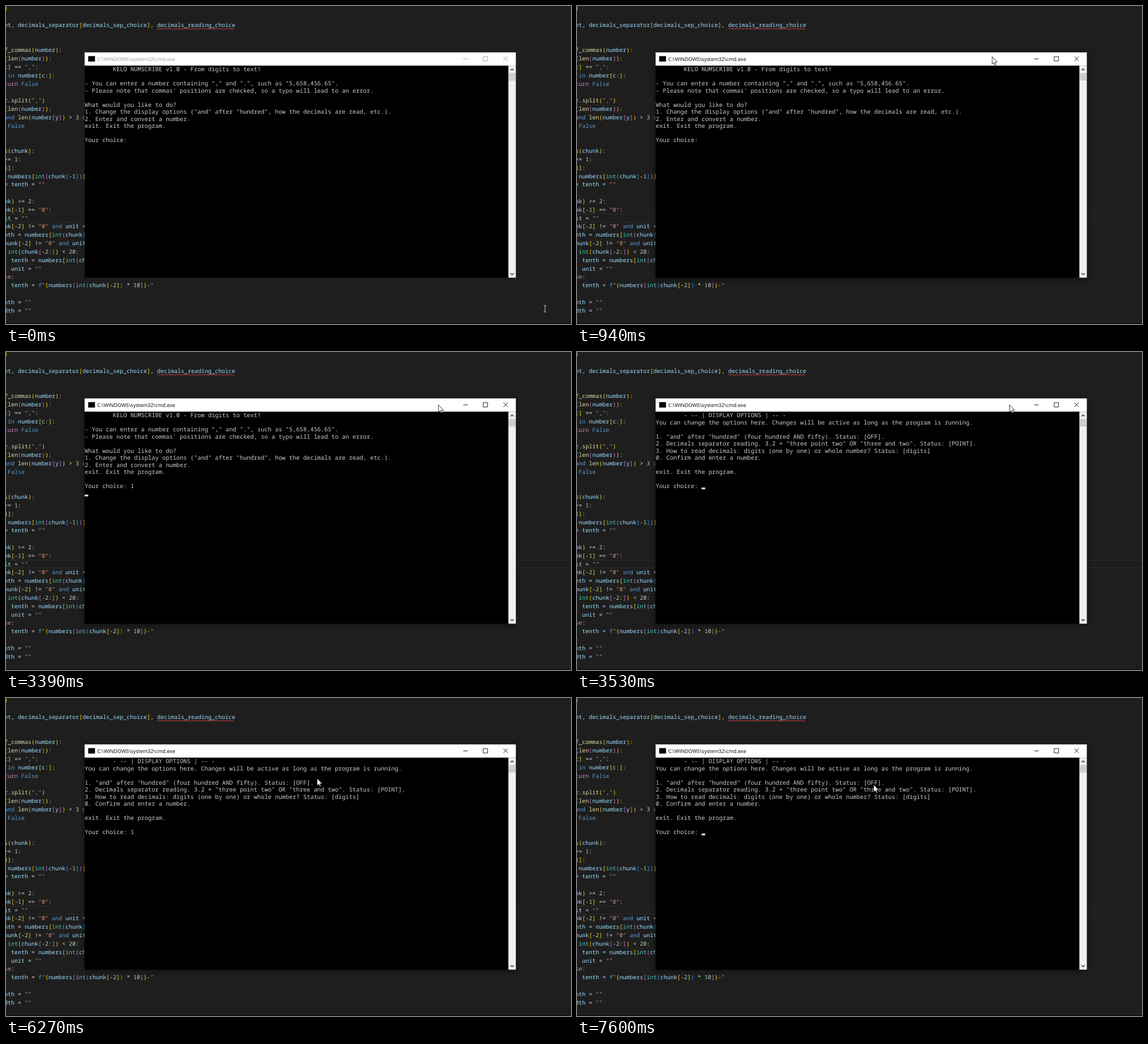
An HTML page that plays this animation: 998x561 px, repeating every 8000 ms.

```html
<!DOCTYPE html>
<html lang="en">
<head>
<meta charset="utf-8">
<title>Number converter</title>
<style>
  html, body { margin: 0; width: 100%; height: 100%; overflow: hidden; background: #1e1e1e; }
  svg { display: block; }
  text { white-space: pre; text-rendering: geometricPrecision; font-family: "Noto Sans Mono", monospace; }
  #code text { font-size: 10.005px; fill: #d4d4d4; }
  #console text { font-size: 10.396px; fill: #ccc; }
  #title { font: 9.01px "Open Sans", sans-serif; }
</style>
</head>
<body>
<svg width="998" height="561" viewBox="0 0 998 561">
  <rect width="998" height="561" fill="#1e1e1e"/>
  <path d="M0 366.9H998M0 380.9H998" stroke="#292929" stroke-width="1.5"/>
  <g id="code"></g>
  <path id="squiggle" fill="none" stroke="#f14c4c" stroke-width=".9"/>
  <rect y="560" width="998" height="1" fill="#050505"/>

  <rect id="shadow" x="139" y="84" width="761.5" height="397" style="filter:blur(5px)" opacity=".5"/>
  <rect x="138.8" y="81.8" width="761.8" height="397.5"/>
  <rect x="138.8" y="81.8" width="761.8" height="23.4" fill="#fff"/>
  <rect x="145.2" y="88.4" width="12" height="9.6"/>
  <g id="bar">
    <text id="title" x="161.3" y="96.6">C:\WINDOWS\system32\cmd.exe</text>
    <path d="M807.6 93.3H815.6M842.9 89.2H850.7V97H842.9ZM878.6 89.1L886.4 96.9M886.4 89.1L878.6 96.9"
      fill="none" stroke="currentColor" stroke-width=".9"/>
  </g>
  <rect x="887.4" y="105.2" width="13.2" height="374.1" fill="#f0f0f0"/>
  <rect x="888" y="118.2" width="12" height="13.4" fill="#cdcdcd"/>
  <path d="M891.2 113.6L894 110.8L896.8 113.6M891.2 471.4L894 474.2L896.8 471.4"
    fill="none" stroke="#484848" stroke-width="1.5"/>

  <g id="console"></g>
  <rect id="caret" width="6.24" height="3.1" fill="#f2f2f2"/>

  <circle id="click" cx="726.8" cy="89.4" r="9.3" fill="#ecd914"/>
  <path id="beam" d="M-2.4 -5.8H-.8L0 -5.2L.8 -5.8H2.4M0 -5.2V5.2M-2.4 5.8H-.8L0 5.2L.8 5.8H2.4"
    fill="none" stroke="#ddd" stroke-width=".9"/>
  <path id="arrow" d="M0 0V13L2.9 10.3L4.9 14.6L6.8 13.8L4.9 9.5H9Z" fill="#fff" stroke="#000" stroke-width=".8"/>
</svg>
<script>
const $ = id => document.getElementById(id);
const esc = s => s.replace(/&/g, '&amp;').replace(/</g, '&lt;');
const show = (el, on) => el.setAttribute('visibility', on ? 'visible' : 'hidden');

// Editor lines by row number; the left edge of the view cuts the first column.
const code = {
  '-2': ')',
  0: 'nt, decimals_separator[decimals_sep_choice], decimals_reading_choice',
  3: 'f_commas(number):',
  4: '(len(number)):',
  5: 'c] == ",":',
  6: ' in number[c:]:',
  7: 'turn False',
  9: 'r.split(",")',
  10: '(len(number)):',
  11: 'and len(number[y]) > 3 or',
  12: ' False',
  15: 's(chunk):',
  16: '>= 1:',
  17: '1]:',
  18: ' numbers[int(chunk[-1])]',
  19: '= tenth = ""',
  21: 'nk) >= 2:',
  22: 'nk[-1] == "0":',
  23: 'it = ""',
  24: 'nk[-2] != "0" and unit ==',
  25: 'nth = numbers[int(chunk[',
  26: 'hunk[-2] != "0" and unit',
  27: ' int(chunk[-2:]) < 20:',
  28: '  tenth = numbers[int(ch',
  29: '  unit = ""',
  30: 'se:',
  31: '  tenth = f"{numbers[int(chunk[-2]) * 10]}-"',
  33: 'nth = ""',
  34: 'dth = ""'
};

const token = /"[^"{}]*"|"(?=\{)|-"$|[a-z_]\w*|\d+|[()[\]{}]/gi;
const pairs = ['#ffd700', '#da70d6', '#179fff'];

function colour(word, next) {
  if (word.includes('"')) return '#ce9178';
  if (/^\d/.test(word)) return '#b5cea8';
  if (/^(and|or|in|False)$/.test(word) || word === 'f' && next === '"') return '#569cd6';
  if (/^(turn|se)$/.test(word)) return '#c586c0';
  if (word === 'int') return '#4ec9b0';
  return next === '(' ? '#dcdcaa' : '#9cdcfe';
}

function highlight(line) {
  let depth = 0, last = 0, out = '';
  for (const m of line.matchAll(token)) {
    const word = m[0], end = m.index + word.length;
    let fill;
    if (/^[([{]$/.test(word)) fill = pairs[depth++ % 3];
    else if (/^[)\]}]$/.test(word)) fill = pairs[(depth = Math.max(0, depth - 1)) % 3];
    else fill = colour(word, line[end]);
    out += esc(line.slice(last, m.index)) + `<tspan fill="${fill}">${esc(word)}</tspan>`;
    last = end;
  }
  return out + esc(line.slice(last));
}

$('code').innerHTML = Object.entries(code).map(([row, line]) =>
  `<text x="-3" y="${36.9 + row * 14.815}">${highlight(line)}</text>`).join('');

$('squiggle').setAttribute('d', 'M267 40.2' + 'q1.17 -2.6 2.34 0t2.34 0'.repeat(29));

// Console screens
const menu = [
  '        KELO NUMSCRIBE v1.0 - From digits to text!', '',
  '- You can enter a number containing "," and ".", such as "5,658,456.65".',
  '- Please note that commas\' positions are checked, so a typo will lead to an error.', '',
  'What would you like to do?',
  '1. Change the display options ("and" after "hundred", how the decimals are read, etc.).',
  '2. Enter and convert a number.',
  'exit. Exit the program.', '',
  'Your choice: '
];
const options = status => [
  '        - -- | DISPLAY OPTIONS | -- -',
  'You can change the options here. Changes will be active as long as the program is running.', '',
  `1. "and" after "hundred" (four hundred AND fifty). Status: [${status}].`,
  '2. Decimals separator reading. 3.2 = "three point two" OR "three and two". Status: [POINT].',
  '3. How to read decimals: digits (one by one) or whole number? Status: [digits]',
  '0. Confirm and enter a number.', '',
  'exit. Exit the program.', '',
  'Your choice: '
];
const off = options('OFF'), on = options('ON');

const cell = { x: 139, y: 105.2, w: 6.2375, h: 12.475 };
const prompt = [13, 10], typed = [14, 10], below = [0, 11];

// time, screen, typed text, caret cell
const steps = [
  [0, menu, '', null],
  [1270, menu, '', prompt],
  [1800, menu, '', null],
  [2340, menu, '', prompt],
  [2860, menu, '', null],
  [3190, menu, '1', typed],
  [3390, menu, '1', below],
  [3460, [], '', null],
  [3530, off, '', prompt],
  [4480, off, '1', typed],
  [5000, off, '1', null],
  [5520, off, '1', typed],
  [6040, off, '1', null],
  [6470, on, '', prompt],
  [7270, on, '1', typed],
  [7530, on, '1', below],
  [7600, off, '', prompt]
];

// time, x, y of the pointer
const path = [
  [0, 952, 534], [65, 952, 534], [200, 926, 478], [400, 822, 264], [560, 745, 120], [665, 727, 89],
  [870, 727, 89], [1000, 740, 90], [1130, 756, 92], [1260, 763.8, 93.2],
  [5780, 763.8, 93.2], [5860, 767, 95], [6000, 735, 101], [6130, 645, 122], [6260, 551, 141],
  [6400, 520, 157], [6530, 508, 168],
  [6650, 508, 168], [6900, 511, 174], [7260, 524, 153], [8000, 524, 153]
];

function pointer(t) {
  const i = Math.max(1, path.findIndex(p => p[0] >= t));
  const [t0, x0, y0] = path[i - 1], [t1, x1, y1] = path[i];
  const k = (t - t0) / (t1 - t0);
  return [x0 + (x1 - x0) * k, y0 + (y1 - y0) * k];
}

let current;
function drawConsole(step) {
  if (step === current) return;
  current = step;
  const [, rows, input, caret] = step;
  $('console').innerHTML = rows.map((line, i) =>
    `<text x="${cell.x}" y="${cell.y + i * cell.h + 10.1}">${esc(i === 10 ? line + input : line)}</text>`).join('');
  show($('caret'), caret);
  if (caret) {
    $('caret').setAttribute('x', cell.x + caret[0] * cell.w);
    $('caret').setAttribute('y', cell.y + (caret[1] + 1) * cell.h - 3.3);
  }
}

function draw(t) {
  drawConsole(steps.findLast(s => s[0] <= t));

  const active = t >= 800;
  $('title').setAttribute('fill', active ? '#000' : '#999');
  $('bar').setAttribute('color', active ? '#000' : '#999');
  show($('shadow'), active);
  show($('click'), t >= 730 && t < 870);

  // The pointer was sampled 15 times a second.
  const tick = 1000 / 15;
  const [x, y] = pointer(Math.floor((t + 5) / tick) * tick);
  const inside = x < 900 && y < 479;
  show($('arrow'), inside);
  show($('beam'), !inside);
  $(inside ? 'arrow' : 'beam').setAttribute('transform', `translate(${x} ${y})`);
}

const start = performance.now();
function frame() {
  draw((performance.now() - start) % 8000);
  requestAnimationFrame(frame);
}
frame();
</script>
</body>
</html>
```
